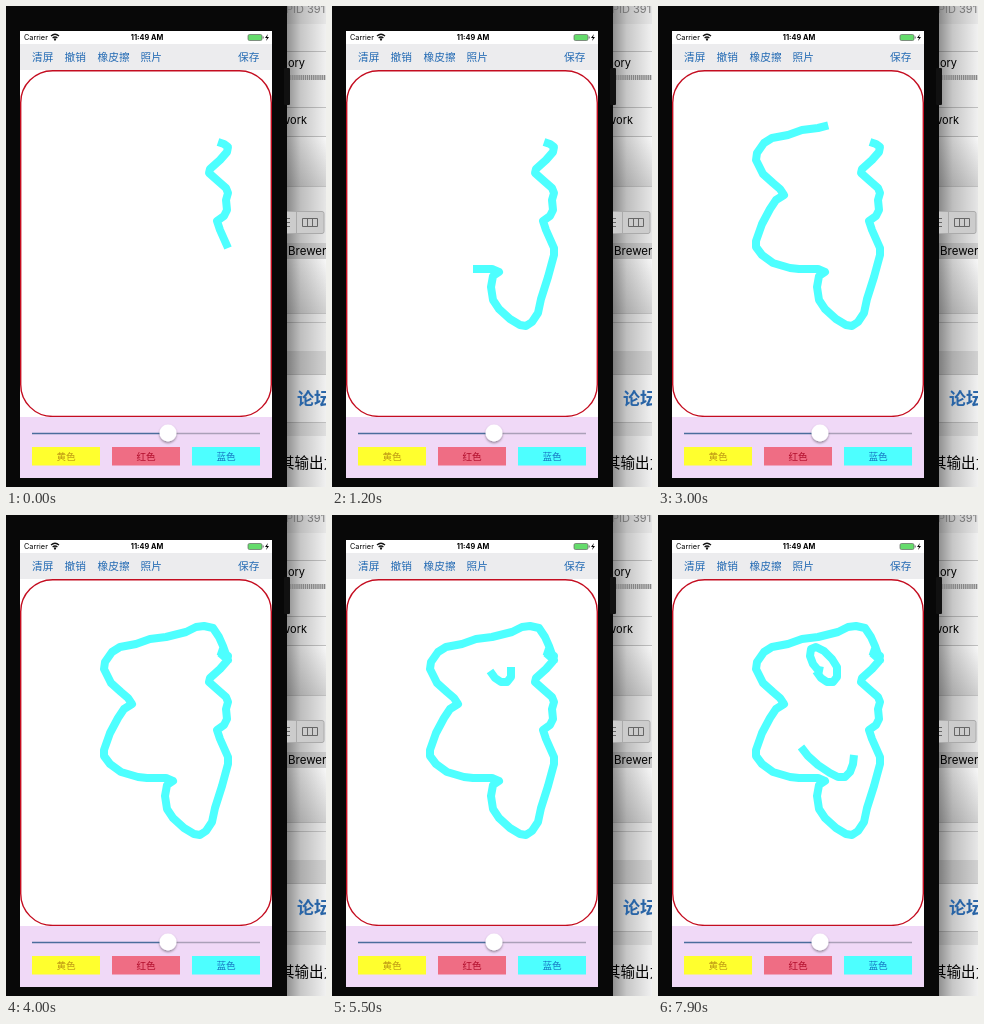
An HTML page that plays this animation: 320x481 px, repeating every 8 s.

```html
<!DOCTYPE html>
<html lang="zh">
<head>
<meta charset="utf-8">
<title>Drawing board</title>
<style>
  html, body { margin: 0; width: 100%; height: 100%; overflow: hidden; background: #080808; }
  svg { display: block; width: 100vw; height: 100vh; }
  text { font-family: Inter, "Noto Sans CJK SC", "Noto Sans CJK", sans-serif; }
  .nav { font-size: 10.7px; fill: #246bb4; }
  .label { font-size: 9.6px; text-anchor: middle; }
  .stroke { fill: none; stroke: #4dffff; stroke-width: 8; stroke-linejoin: round; }
  .rule { stroke: #c6c6c6; }
</style>
</head>
<body>
<svg viewBox="0 0 320 481" preserveAspectRatio="none">
  <defs>
    <linearGradient id="shade">
      <stop offset="0" stop-color="#000" stop-opacity=".42"/>
      <stop offset=".35" stop-color="#000" stop-opacity=".2"/>
      <stop offset="1" stop-color="#000" stop-opacity=".03"/>
    </linearGradient>
    <linearGradient id="fade" x2="0" y2="1">
      <stop offset="0" stop-color="#fff"/>
      <stop offset="1" stop-color="#d6d6d6"/>
    </linearGradient>
    <filter id="soft" x="-50%" y="-50%" width="200%" height="200%">
      <feDropShadow dx="0" dy="1.5" stdDeviation="1.3" flood-opacity=".4"/>
    </filter>
  </defs>

  <!-- desktop behind the phone -->
  <g>
    <rect x="276" width="44" height="481" fill="#f8f8f8"/>
    <rect x="276" width="44" height="18" fill="#ededed"/>
    <rect x="276" y="131" width="44" height="49" fill="url(#fade)"/>
    <rect x="276" y="181" width="44" height="56" fill="#ededed"/>
    <rect x="276" y="237" width="44" height="16" fill="#d2d2d2"/>
    <rect x="276" y="253" width="44" height="54" fill="url(#fade)"/>
    <rect x="276" y="308" width="44" height="37" fill="#eee"/>
    <rect x="276" y="345" width="44" height="23" fill="#d8d8d8"/>
    <rect x="276" y="416" width="44" height="14" fill="#e6e6e6"/>
    <path class="rule" d="M276 45.5h44M276 101.5h44M276 130.5h44M276 180.5h44M276 307.5h44M276 316.5h44M276 368.5h44M276 416.5h44"/>
    <rect x="281" width="39" height="481" fill="url(#shade)"/>
    <path d="M284 71.5h36" stroke="#858585" stroke-width="5" stroke-dasharray="1.4 .7"/>
    <rect x="270" y="205.5" width="48" height="22" rx="2" fill="#ccc" stroke="#aaa"/>
    <path d="M290.5 206v21" stroke="#aaa"/>
    <path d="M296.500 212.500h15v8h-15zM301.500 212.500v8M306.500 212.500v8M276 212.500h8M276 216.500h8M276 220.500h8" fill="none" stroke="#666"/>
    <text x="280" y="7" font-size="11" fill="#777">PID 391</text>
    <text x="299" y="61" font-size="11" text-anchor="end">Memory</text>
    <text x="301" y="118" font-size="11" text-anchor="end">Network</text>
    <text x="282" y="249" font-size="11.500">Brewer</text>
    <text x="291" y="399" font-size="17" font-weight="700" fill="#2864a6">论坛</text>
    <text x="274" y="462" font-size="14.500">其输出为</text>
  </g>

  <!-- phone -->
  <rect width="281" height="481" fill="#080808"/>
  <rect x="278" y="62" width="6" height="37" rx="1" fill="#111"/>
  <rect x="14" y="25" width="252" height="447" fill="#fff"/>
  <text x="18" y="34" font-size="7.300">Carrier</text>
  <g fill="none" stroke="#111" stroke-width="1.300">
    <path d="M45 30q4-3.600 8 0M46.600 32q2.400-2 4.800 0"/>
    <circle cx="49" cy="33.500" r=".5"/>
  </g>
  <text x="141" y="34" font-size="7.300" font-weight="700" text-anchor="middle">11:49 AM</text>
  <rect x="242" y="28.500" width="14" height="6" rx="1.500" fill="#65dc6c" stroke="#666" stroke-width=".7"/>
  <path d="M257.200 30.500v2" stroke="#666"/>
  <path d="M262 28l-3 4h2l-1 3 3-4h-2z"/>

  <rect x="14" y="38" width="252" height="26" fill="#ececee"/>
  <g class="nav">
    <text x="26" y="55">清屏</text>
    <text x="58.500" y="55">撤销</text>
    <text x="91.500" y="55">橡皮擦</text>
    <text x="134.500" y="55">照片</text>
    <text x="232" y="55">保存</text>
  </g>

  <rect x="14.700" y="64.700" width="250.600" height="345.800" rx="32" fill="#fff" stroke="#c40d20" stroke-width="1.400"/>
  <g id="ink"></g>

  <rect x="14" y="411" width="252" height="61" fill="#f0d9f7"/>
  <path d="M26 427.500h136" stroke="#4a6d9c" stroke-width="1.300"/>
  <path d="M162 427.500h92" stroke="#aaa0b8" stroke-width="1.300"/>
  <circle cx="162" cy="427" r="8.500" fill="#fff" filter="url(#soft)"/>
  <g class="label">
    <rect x="26" y="441" width="68" height="18.500" fill="#ffff2e"/>
    <text x="60" y="454" fill="#bd9714">黄色</text>
    <rect x="106" y="441" width="68" height="18.500" fill="#ef6d84"/>
    <text x="140" y="454" fill="#b00d2b">红色</text>
    <rect x="186" y="441" width="68" height="18.500" fill="#4dffff"/>
    <text x="220" y="454" fill="#1878c4">蓝色</text>
  </g>
</svg>
<script>
const LOOP = 8000, STEP = 100;

// Each stroke is a chain of legs: start time, end time, points.
const strokes = [
  [
    [-1, 0, '212,136 218,138 222,141 221,146 214,154 204,163 203,167 212,175 220,182 222,187 220,194 221,204 218,210 211,215 214,224 222,242'],
    [100, 1200, '222,249 216,271 209,293 206,307 200,316 194,320 188,319 178,313 167,303 161,294 159,281 161,270 167,266 160,263 141,263'],
    [1300, 2100, '132,262 115,257 104,249 98,241 98,235 104,218 112,203 118,194 126,189 122,183 115,177'],
    [2100, 3300, '105,168 98,154 99,147 106,137 114,132 130,129 144,124 160,122 180,117 190,112 198,111 207,113'],
    [3300, 3800, '213,122 217,131 222,145 214,138']
  ],
  [
    [4900, 5500, '158,156 163,163 169,167 175,167 179,162 179,152'],
    [5500, 6300, '174,144 166,136 158,132 153,134 152,141 155,149 160,155 165,156']
  ],
  [
    [6900, 7900, '143,232 150,241 160,250 172,258 180,262 187,262 192,257 195,249 196,240']
  ]
];

const parse = text => text.split(' ').map(pair => pair.split(',').map(Number));
const distance = (a, b) => Math.hypot(b[0] - a[0], b[1] - a[1]);

// The leading part of a polyline, measured by length.
function portion(points, fraction) {
  let total = 0;
  for (let i = 1; i < points.length; i++) total += distance(points[i - 1], points[i]);
  let left = total * fraction;
  const result = [points[0]];
  for (let i = 1; i < points.length && left > 0; i++) {
    const [a, b] = [points[i - 1], points[i]];
    const part = Math.min(1, left / distance(a, b));
    result.push([a[0] + (b[0] - a[0]) * part, a[1] + (b[1] - a[1]) * part]);
    left -= distance(a, b);
  }
  return result;
}

const lines = strokes.map(legs => {
  const element = document.createElementNS('http://www.w3.org/2000/svg', 'polyline');
  element.setAttribute('class', 'stroke');
  document.getElementById('ink').append(element);
  let last = null;
  const parsed = legs.map(([start, end, text]) => {
    const points = parse(text);
    if (last) points.unshift(last);
    last = points[points.length - 1];
    return { start, end, points };
  });
  return { element, legs: parsed };
});

function draw(time) {
  for (const { element, legs } of lines) {
    const points = legs.filter(leg => time > leg.start).flatMap(leg =>
      portion(leg.points, Math.min(1, (time - leg.start) / (leg.end - leg.start))));
    element.setAttribute('points', points.join(' '));
  }
}

const origin = performance.now();
function frame() {
  const time = (performance.now() - origin) % LOOP;
  draw(Math.floor(time / STEP) * STEP);
  requestAnimationFrame(frame);
}
frame();
</script>
</body>
</html>
```
